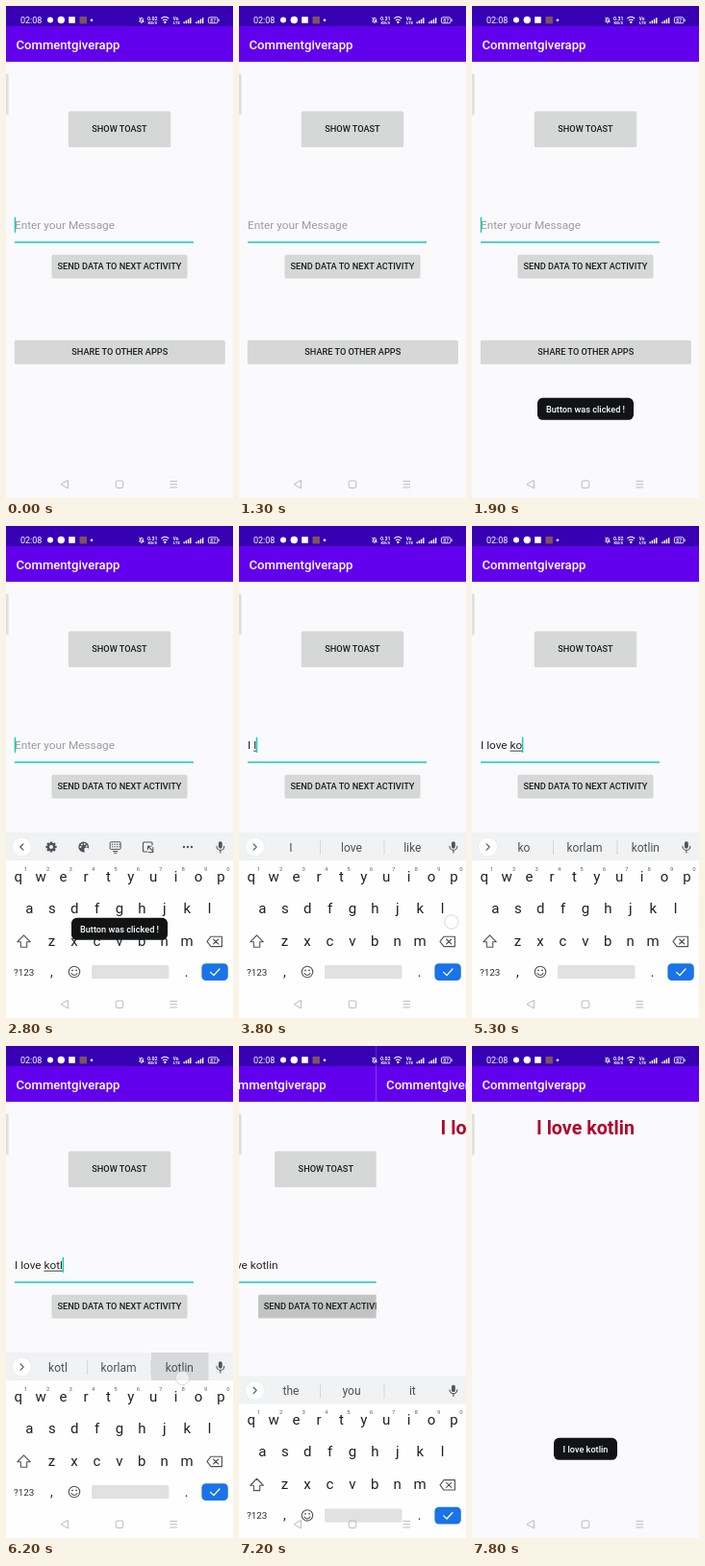
An HTML page for the animation above (8 s loop, 236 by 512 pixels).

```html
<!DOCTYPE html>
<html lang="en">
<head>
<meta charset="utf-8">
<title>Message app</title>
<style>
html, body { margin: 0; width: 100%; height: 100%; overflow: hidden; background: #fafafc; }
svg { display: block; width: 236px; height: 512px; }
text { font-family: Roboto, "Noto Sans", sans-serif; white-space: pre; }
.m { text-anchor: middle; }
.med { font-weight: 500; }
.line { fill: none; stroke: #50545a; stroke-width: 1.1; stroke-linecap: round; stroke-linejoin: round; }
</style>
</head>
<body>
<svg id="stage" viewBox="0 0 236 512"></svg>
<script>
const LOOP = 8000;
const rect = (x, y, w, h, fill, r = 0, more = '') =>
  `<rect x="${x}" y="${y}" width="${w}" height="${h}" rx="${r}" fill="${fill}" ${more}/>`;
const label = (x, y, size, fill, str, cls = 'm', more = '') =>
  `<text x="${x}" y="${y}" font-size="${size}" fill="${fill}" class="${cls}" ${more}>${str}</text>`;
const path = (d, more = '') => `<path class="line" d="${d}" ${more}/>`;
const circle = (x, y, r, fill, more = '') => `<circle cx="${x}" cy="${y}" r="${r}" fill="${fill}" ${more}/>`;
const range = n => [...Array(n).keys()];

const header = () =>
  rect(0, 0, 236, 512, '#fafafc') +
  rect(0, 58, 236, 1, '#000', 0, 'opacity=".05"') +
  rect(0, 0, 236, 58, '#6200ee') + rect(0, 0, 236, 21, '#3700b3') +
  label(10.5, 44.5, 13.1, '#fff', 'Commentgiverapp', 'med');

const button = (id, x, y, w, h, str) =>
  rect(x - .2, y + .6, w + .4, h + .3, '#000', 1.5, 'opacity=".15"') +
  rect(x, y, w, h, '#d6d7d7', 1.5, `id="${id}"`) +
  label(x + w / 2, y + h / 2 + 3.3, 9.18, '#1c1c1e', str, 'm med');

const bars = x => range(4).map(i =>
  rect(x + i * 2.2, 16.4 - i * 1.4, 1.4, 1.8 + i * 1.4, '#fff')).join('');

function statusBar() {
  return label(15, 18.4, 9, '#fff', '02:08', '') +
    circle(46, 14.5, 3, '#fff') + circle(57.3, 14.5, 3.7, '#fff') +
    rect(65.2, 11.2, 6.6, 6.6, '#fff') + rect(76.5, 11, 7.4, 7.4, '#7d5558') +
    circle(89, 14.7, 1.3, '#fff') +
    `<g fill="none" stroke="#fff" stroke-width=".9">
      <path d="M138.6 16.2H143.2L142.4 15V13.4A1.6 1.6 0 0 0 139.4 13.4V15ZM140.2 17.6H141.6M138.4 11.8L143.4 17.2"/>
      <path stroke-width="1.1" d="M161.4 13Q165.3 9.6 169.2 13M163 15Q165.3 13 167.6 15"/>
      <rect x="210.4" y="11.8" width="9.6" height="6" rx="1.4"/></g>` +
    circle(165.3, 16.9, 1.2, '#fff') + rect(220.6, 13.6, 1, 2.4, '#fff') +
    label(152.3, 14.5, 5.3, '#fff', '', 'm', 'id="speed" font-weight="700"') +
    label(152.3, 18.9, 4.2, '#fff', 'KB/S', 'm', 'font-weight="700"') +
    label(176.6, 14.6, 4.7, '#fff', 'Vo', 'm', 'font-weight="700"') +
    label(177.4, 18.9, 4.4, '#fff', 'LTE', 'm', 'font-weight="700"') +
    bars(184.5) + bars(197.3) + label(215.2, 16.8, 5, '#fff', '87', 'm med');
}

function navBar() {
  return `<g fill="none" stroke="#b4b4b6" stroke-width=".9" stroke-linejoin="round">
    <path d="M57 497.7L64.4 493.5V502Z"/><rect x="114.2" y="494" width="7.6" height="7.6" rx="1.8"/>
    <path d="M170.4 494.6H178M170.4 497.8H178M170.4 501H178"/></g>`;
}

function gear(x, y) {
  const teeth = range(8).map(i =>
    rect(x - 1.2, y - 5.6, 2.4, 2.6, '#50545a', .4, `transform="rotate(${i * 45} ${x} ${y})"`)).join('');
  return teeth + circle(x, y, 3.1, 'none', 'stroke="#50545a" stroke-width="2.2"');
}

function toolbar() {
  const keys = range(8).map(i => rect(109.9 + i % 4 * 2.5, 330.7 + (i >> 2) * 2.4, 1.2, 1.2, '#50545a')).join('');
  return gear(47, 334) +
    circle(80.7, 334, 5.4, '#50545a') + circle(83.6, 337, 2.4, '#f0f2f3') +
    range(4).map(i => circle(80.7 - 3.2 * Math.cos(i * .95), 334 - 3.2 * Math.sin(i * .95), .95, '#f0f2f3')).join('') +
    rect(108.2, 328.8, 11, 7.6, 'none', 1, 'stroke="#50545a" stroke-width="1"') + keys +
    path('M111.5 338.5H116M112.5 340.2H115') +
    path('M152 332V330Q152 329 151 329H143.5Q142.5 329 142.5 330V338Q142.5 339 143.5 339H147') +
    path('M147.5 333.2L152.5 338.2M147.5 336.5V333.2H150.8') + path('M152.8 334.5V339.5H148.5') +
    [185, 189, 193].map(x => circle(x, 334, 1.2, '#50545a')).join('');
}

function suggestions() {
  return rect(151, 319, 59.5, 29, '#d7d9db', 0, 'id="pick"') +
    [84.5, 151].map(x => rect(x - .4, 327, .8, 15, '#ced1d4')).join('') +
    [54, 117, 180.3].map((x, i) => label(x, 339, 12, '#4d5155', '', 'm', `id="word${i}"`)).join('');
}

const STEP = 23.4;
const rows = [['qwertyuiop', 12.8, 370], ['asdfghjkl', 24.4, 403], ['zxcvbnm', 47.6, 437]];

function keyboard() {
  const letters = rows.map(([str, x, y]) => [...str].map((c, i) =>
    label(x + i * STEP, y, 15, '#1f2124', c)).join('')).join('');
  const digits = range(10).map(i => label(20.4 + i * STEP, 359, 6, '#5f6368', (i + 1) % 10)).join('');
  return rect(0, 319, 236, 193, '#fefefe') + rect(0, 319, 236, 29, '#f0f2f3') +
    `<g id="tools">${toolbar()}</g><g id="sugs">${suggestions()}</g>` +
    circle(16.5, 334, 10, '#fff', 'stroke="#e2e4e7" stroke-width=".6"') +
    path('', 'id="chev"') +
    rect(221, 328.2, 3.8, 7.4, '#50545a', 1.9) + path('M219 333.4A3.9 3.9 0 0 0 226.8 333.4M222.9 337.5V340') +
    letters + digits +
    path('M18.5 425.8L25.3 432.8H21.7V438.2H15.3V432.8H11.7Z') +
    path('M209 432.4L213 427.2H224.5V437.6H213ZM215.6 430L220.8 435M220.8 430L215.6 435') +
    label(18.6, 467.6, 9.8, '#2c2f33', '?123') + label(47.5, 468.5, 14, '#1f2124', ',') +
    circle(71, 464, 5.7, 'none', 'stroke="#50545a" stroke-width="1.1"') +
    circle(69, 462.4, .9, '#50545a') + circle(73, 462.4, .9, '#50545a') + path('M68 465.6Q71 469.4 74 465.6') +
    rect(89, 457, 80.5, 14.3, '#dfe1e3', 2) + label(187.7, 468.5, 14, '#1f2124', '.') +
    rect(203.4, 455.2, 27.4, 17.8, '#1a73e8', 4.5) +
    path('M212.6 464.4L216 467.6L222 461', 'style="stroke:#fff;stroke-width:1.3"');
}

const toast = (id, x, w, str) => `<g id="${id}">` + rect(x, 407.8, w, 23, '#121315', 5.5) +
  label(x + w / 2, 422.7, 9.18, '#fff', str, 'm med') + '</g>';

document.getElementById('stage').innerHTML =
  `<g id="main">${header()}` +
  button('show', 65, 109.5, 106, 36.5, 'SHOW TOAST') +
  button('send', 47.8, 258.7, 140.4, 24, 'SEND DATA TO NEXT ACTIVITY') +
  button('share', 9, 347.8, 218.5, 24, 'SHARE TO OTHER APPS') +
  label(9, 232.2, 11.8, '#9b9b9d', 'Enter your Message', '', 'id="hint"') +
  label(9, 232.2, 11.8, '#222', '', '', 'id="entry"') +
  rect(9, 233.6, 0, 1, '#3a3a3c', 0, 'id="under"') +
  rect(9, 245, 186, 1.7, '#35cdc3') +
  rect(8.7, 219.8, 1.5, 16, '#18cdbb', 0, 'id="caret"') + '</g>' +
  `<g id="next">${header()}` + label(118, 92, 19.7, '#b0062f', 'I love kotlin', 'm', 'font-weight="700"') + '</g>' +
  rect(-1, 70.5, 3.6, 43, '#dfdfe1', 1.4) +
  `<g id="board">${keyboard()}</g>` + statusBar() + navBar() +
  toast('toast1', 68, 100, 'Button was clicked !') + toast('toast2', 85, 66, 'I love kotlin') +
  circle(0, 0, 7.2, '#fff', 'id="touch" fill-opacity=".55" stroke="#c6c8ca" stroke-width=".7"');

const $ = {};
document.querySelectorAll('[id]').forEach(e => $[e.id] = e);
const set = (el, name, v) => el.setAttribute(name, v);
const show = (el, on) => set(el, 'opacity', +on);
const ramp = (t, a, b) => Math.min(1, Math.max(0, (t - a) / (b - a)));
const ease = k => 1 - (1 - k) ** 3;
const last = (list, t) => list.filter(e => e[0] <= t).pop();

// [time, committed text, word being composed]
const edits = [
  [2400, '', ''], [3300, '', 'i'], [3500, 'I ', ''], [3750, 'I ', 'l'], [4400, 'I love', ''],
  [4900, 'I love ', 'k'], [5200, 'I love ', 'ko'], [5500, 'I love ', 'kot'], [5800, 'I love ', 'kotl'],
  [6300, 'I love kotlin', '']
];
const words = [
  [0, 'I', 'love', 'like'], [4400, 'the', 'you', 'it'], [4900, '', 'korlam', 'kotlin'], [6300, 'the', 'you', 'it']
];
// [start, end, x, y]
const touches = [
  [1500, 1640, 118, 130], [2400, 2480, 80, 230], [3220, 3310, 177, 366], [3430, 3520, 130, 464],
  [3700, 3890, 221, 412], [4270, 4400, 117, 338], [4830, 4930, 188, 400], [5130, 5230, 200, 368],
  [5430, 5530, 106, 368], [5700, 5795, 212, 402], [6190, 6300, 183.5, 345.5], [7000, 7130, 118, 272]
];

function caretOn(t) {
  if (t < 2400) return t < 200 || (t >= 700 && t < 1200) || t >= 1700;
  return (t - last(edits, t)[0]) % 1000 < 500;
}

function draw(t) {
  const [, done, typing] = last(edits, t) || [0, '', ''];
  $.speed.textContent = t < 1000 ? '0.02' : t < 4200 ? '0.31' : t < 7300 ? '0.02' : '0.04';

  $.entry.textContent = done;
  const from = done ? $.entry.getComputedTextLength() : 0;
  $.entry.textContent = done + typing;
  const to = done + typing ? $.entry.getComputedTextLength() : 0;
  show($.hint, !(done + typing));
  set($.under, 'x', 9 + from);
  set($.under, 'width', typing ? to - from : 0);
  set($.caret, 'x', 8.7 + to);
  show($.caret, caretOn(t));

  const typed = t >= 3300;
  show($.tools, !typed);
  show($.sugs, typed);
  last(words, t).slice(1).forEach((w, i) => $['word' + i].textContent = w || typing);
  set($.chev, 'd', typed ? 'M15 330.8L18.2 334L15 337.2' : 'M18 330.8L14.8 334L18 337.2');
  show($.pick, t >= 6190 && t < 6300);

  const up = ease(ramp(t, 2430, 2700)) - ramp(t, 7130, 7330) ** 2;
  set($.board, 'transform', `translate(0 ${(1 - up) * 194})`);

  const slide = ease(ramp(t, 7150, 7480));
  set($.main, 'transform', `translate(${-70 * slide} 0)`);
  set($.next, 'transform', `translate(${236 * (1 - slide)} 0)`);

  set($.toast1, 'opacity', ramp(t, 1650, 1800) - ramp(t, 3450, 3650));
  set($.toast2, 'opacity', ramp(t, 7480, 7640));

  const tap = touches.find(p => t >= p[0] && t < p[1]);
  show($.touch, !!tap);
  if (tap) set($.touch, 'transform', `translate(${tap[2]} ${tap[3]})`);
  set($.show, 'fill', t >= 1500 && t < 1700 ? '#c2c3c3' : '#d6d7d7');
  set($.send, 'fill', t >= 7000 && t < 7250 ? '#c2c3c3' : '#d6d7d7');
}

const start = performance.now();
function tick() {
  draw((performance.now() - start) % LOOP);
  requestAnimationFrame(tick);
}
draw(0);
tick();
</script>
</body>
</html>
```
